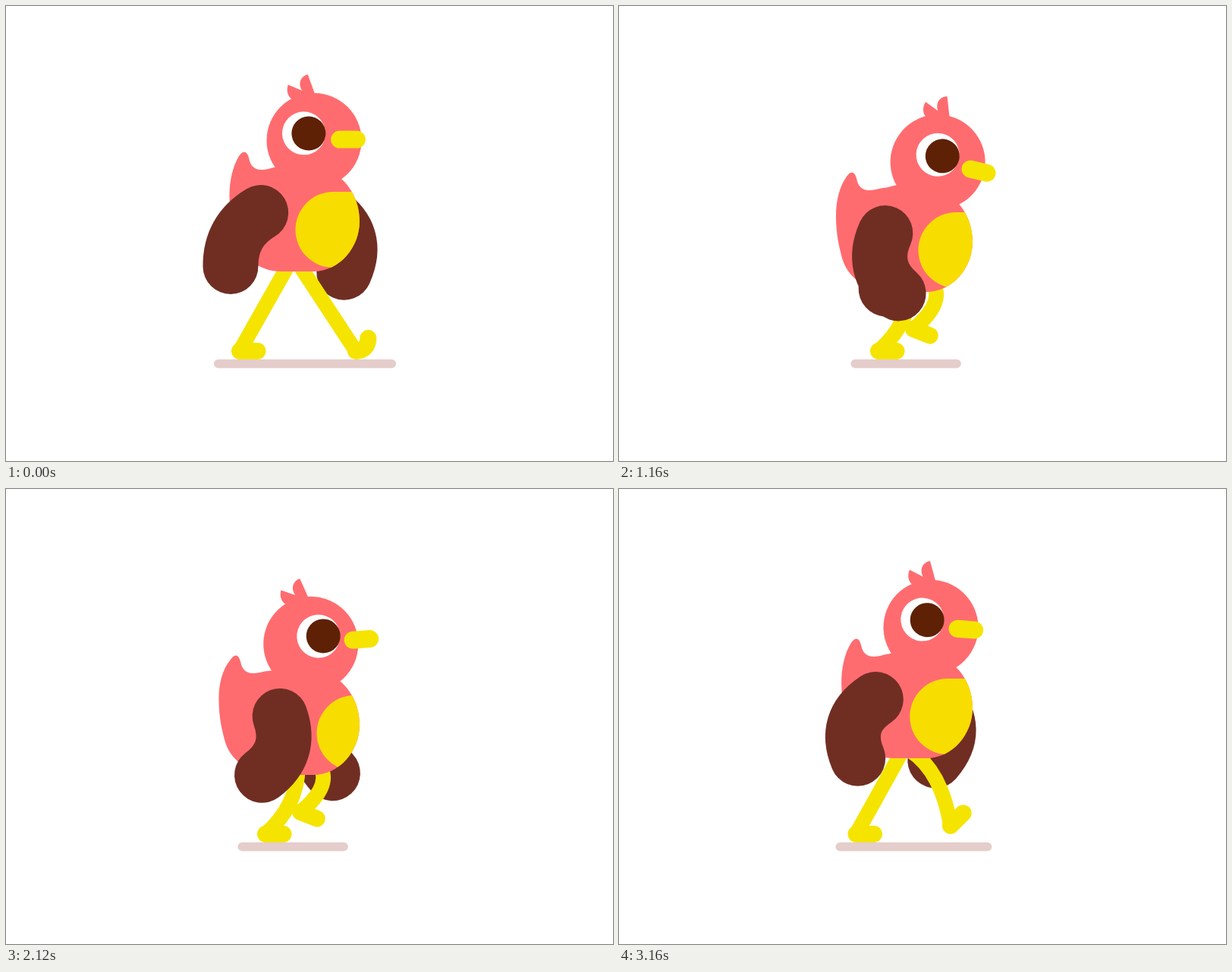
These frames come from a looping animation (800x600 px, 3200 ms). An HTML page with a canvas:

```html
<!DOCTYPE html>
<html lang="en">
<head>
<meta charset="utf-8">
<title>Walking bird</title>
<style>
  html, body { margin: 0; width: 100%; height: 100%; overflow: hidden; background: #fff; }
  canvas { display: block; }
</style>
</head>
<body>
<canvas id="stage" width="800" height="600"></canvas>
<script>
const ctx = document.getElementById('stage').getContext('2d');
const CYCLE = 640, STEP = 320, TICK = 40;
const PINK = '#ff6c70', BROWN = '#702e23', YELLOW = '#f5e400',
      BELLY = '#f8dd00', PUPIL = '#5e2105', SHADOW = '#e4cdca';

// Leg poses: time, hip x, knee x, knee y, ankle x, ankle y, foot angle, toe curl
const POSES = [
  [0, 385.5, 423, 397, 461, 455, -46, 1],
  [40, 387, 428, 390, 436, 455, 0, 0],
  [200, 385, 384, 418, 342, 455, 0, 0],
  [280, 373.5, 345, 397, 312.5, 455, 0, 0],
  [320, 373, 340.5, 397, 308, 455, 0, 0],
  [360, 373, 367, 408, 313, 445, 29, 0.75],
  [440, 394, 402, 402, 346, 428, 40, 0],
  [520, 415, 428, 393, 388, 426, 21.5, 0],
  [600, 384, 425, 372, 437, 444, -45, 0]
];

const rad = deg => deg * Math.PI / 180;
const smooth = x => x * x * (3 - 2 * x);
const pose = i => POSES[(i + POSES.length) % POSES.length];
const span = i => (pose(i + 1)[0] - pose(i)[0] + CYCLE) % CYCLE;
const slope = (i, c) => (pose(i + 1)[c] - pose(i)[c]) / span(i);

function tangent(i, c) {
  const a = slope(i - 1, c), b = slope(i, c);
  return a * b <= 0 ? 0 : 2 * a * b / (a + b);
}

// Smooth interpolation between poses without overshoot
function poseAt(q) {
  let i = POSES.length - 1;
  while (POSES[i][0] > q) i--;
  const h = span(i), s = (q - POSES[i][0]) / h, e = smooth(s);
  return POSES[i].slice(1).map((from, k) => {
    const c = k + 1;
    return from + (pose(i + 1)[c] - from) * e +
      h * s * (1 - s) * ((1 - s) * tangent(i, c) - s * tangent(i + 1, c));
  });
}

function stroke(color, width, path) {
  ctx.beginPath();
  path();
  ctx.strokeStyle = color;
  ctx.lineWidth = width;
  ctx.stroke();
}

function fill(color, path) {
  ctx.beginPath();
  path();
  ctx.fillStyle = color;
  ctx.fill();
}

const disc = (color, x, y, r) => fill(color, () => ctx.arc(x, y, r, 0, 7));

function bar(color, width, x1, x2, y) {
  stroke(color, width, () => { ctx.moveTo(x1, y); ctx.lineTo(x2, y); });
}

// Thick curved limb; bulge pushes its middle sideways, positive is forward
function wing(sx, sy, hx, hy, bulge) {
  const dx = hx - sx, dy = hy - sy, len = Math.hypot(dx, dy);
  stroke(BROWN, 73, () => {
    ctx.moveTo(sx, sy);
    ctx.quadraticCurveTo((sx + hx) / 2 + bulge * dy / len,
                         (sy + hy) / 2 - bulge * dx / len, hx, hy);
  });
}

function leg(q, drop) {
  const [hip, kx, ky, ax, ay, angle, curl] = poseAt(q % CYCLE);
  const cos = Math.cos(rad(angle)), sin = Math.sin(rad(angle));
  stroke(YELLOW, 19.5, () => {
    ctx.moveTo(hip, 340 + drop);
    ctx.quadraticCurveTo(kx, ky, ax, ay);
  });
  stroke(YELLOW, 22, () => {
    ctx.moveTo(ax, ay);
    ctx.quadraticCurveTo(ax + 11.7 * cos - 11 * curl * sin, ay + 11.7 * sin + 11 * curl * cos,
                         ax + 23.5 * cos, ay + 23.5 * sin);
  });
}

// s moves the back, t moves the tail
function bodyPath(s, t) {
  ctx.moveTo(405, 350);
  ctx.bezierCurveTo(440, 350, 466, 318, 466, 284);
  ctx.bezierCurveTo(466, 260, 456, 240, 441, 227);
  ctx.lineTo(400, 200);
  ctx.lineTo(356 - t / 2, 212.5);
  ctx.bezierCurveTo(350 - t, 213, 345 - t, 216, 337 - t, 216);
  ctx.bezierCurveTo(327 - t, 216, 322 - t, 210, 320.5 - t, 202);
  ctx.bezierCurveTo(319 - t, 196, 317 - t, 192.5, 314 - t, 192.5);
  ctx.bezierCurveTo(311 - t, 192.5, 309 - t, 195, 307 - t, 198);
  ctx.bezierCurveTo(299 - s, 211, 294.5 - s, 230, 294.5 - s, 250);
  ctx.bezierCurveTo(294.5 - s, 275, 299 - s, 292, 303 - s, 307);
  ctx.bezierCurveTo(311 - s, 332, 335 - s, 350, 362, 350);
  ctx.closePath();
}

function body(turn, low, drop) {
  ctx.save();
  ctx.translate(0, drop);
  fill(PINK, () => bodyPath(15 * turn + 4.5 * low, 11 * turn + 4.2 * low));
  ctx.clip();
  fill(BELLY, () => ctx.roundRect(381.5 + 41 * turn, 245, 200, 100, 50));
  ctx.restore();
}

function head(tilt, turn, drop) {
  ctx.save();
  ctx.translate(406.2, 237.2 + drop);
  ctx.rotate(rad(tilt));
  ctx.translate(0, -60);
  fill(PINK, () => {
    ctx.moveTo(-8, -87);
    ctx.bezierCurveTo(-17, -85, -22, -75, -15, -65);
    ctx.lineTo(-14, -58);
    ctx.lineTo(1, -58);
    ctx.lineTo(1, -62);
    ctx.closePath();
    ctx.moveTo(-34, -73.5);
    ctx.bezierCurveTo(-37, -65, -34, -57, -28, -54);
    ctx.lineTo(-14, -58);
    ctx.lineTo(-14, -65);
    ctx.closePath();
  });
  disc(PINK, 0, 0, 62.5);
  const eye = -13.5 + 35.5 * turn, beak = 45 + 32 * turn;
  disc('#fff', eye, -9.4, 28.5);
  disc(PUPIL, eye + 6.4, -9.2, 22.5);
  bar(YELLOW, 23, beak - 11.3, beak + 11.3, -1);
  ctx.restore();
}

function draw(time) {
  const phase = time % CYCLE;
  const swing = lag => Math.cos(rad(phase / CYCLE * 360 - lag));
  const turn = smooth(1 - Math.abs(phase / STEP - 1));
  const pass = 1 - Math.abs((phase % STEP) / (STEP / 2) - 1);
  const low = smooth(pass), drop = 32 * low;
  const shoulder = 272.5 + drop;

  ctx.fillStyle = '#fff';
  ctx.fillRect(0, 0, 800, 600);
  ctx.lineCap = ctx.lineJoin = 'round';

  bar(SHADOW, 11.5, 279.7 + (48 - 8 * pass) * pass, 508.3 - (94 - 13 * pass) * pass, 471.8);

  const far = swing(50);
  wing(406 + 25 * swing(45), shoulder,
       391.3 + 84.7 * far, 354 + drop - 10 * far * far - 6 * low + 2 * far,
       36 * swing(-18));
  leg(phase, drop);
  leg(phase + STEP, drop);
  body(turn, low, drop);
  head(4.6 - 12.5 * swing(67.5), turn, drop);

  // The near wing holds its bend, then flips it quickly
  const sx = 356 - 20.5 * swing(8), arm = rad(-2.3 - 38.1 * swing(45));
  const flip = swing(-64), bend = 1.5 * flip - 0.5 * flip ** 3;
  wing(sx, shoulder, sx + 81.3 * Math.sin(arm), shoulder + 81.3 * Math.cos(arm),
       -38 * bend * (1 - 0.25 * low));
}

const start = performance.now();
function frame() {
  draw(Math.floor((performance.now() - start) / TICK) * TICK);
  requestAnimationFrame(frame);
}
frame();
</script>
</body>
</html>
```
